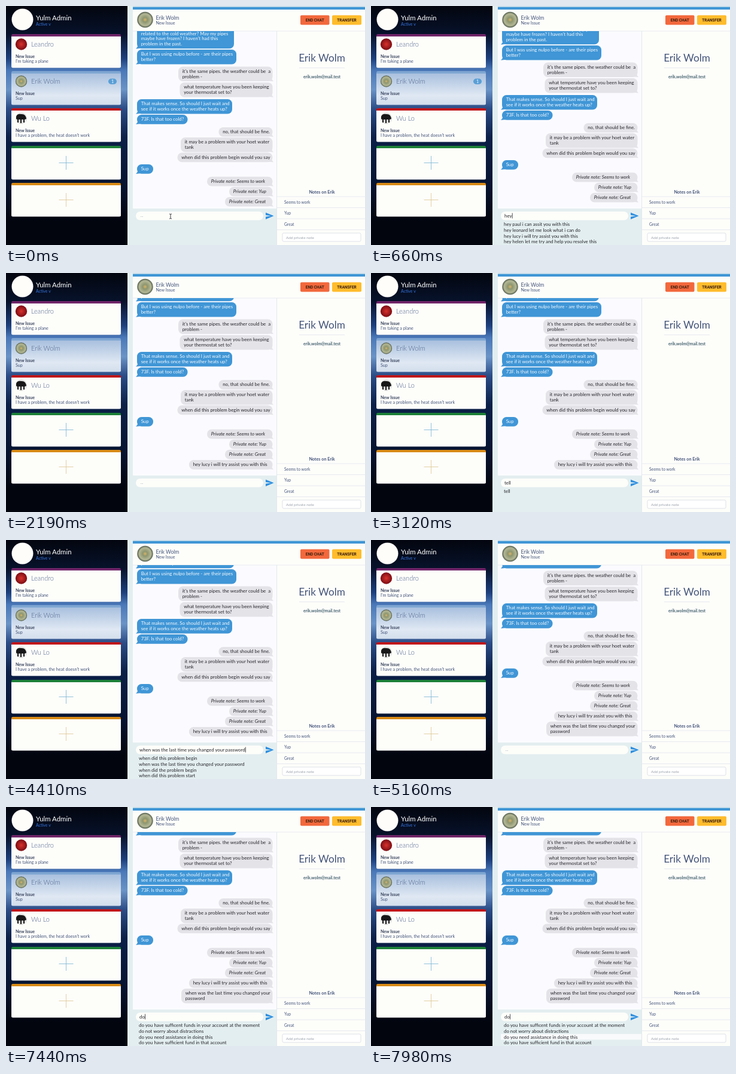
These frames come from a looping animation (600 px wide and 400 px high, 8000 ms). An HTML page:

```html
<!DOCTYPE html>
<html lang="en">
<head>
<meta charset="utf-8">
<title>Support chat with suggestions</title>
<style>
html, body { margin: 0; width: 100%; height: 100%; overflow: hidden; }
svg { display: block; width: 100vw; height: 100vh; }
text { font-family: Lato, sans-serif; white-space: pre; }
</style>
</head>
<body>
<svg id="stage" viewBox="0 0 600 400" preserveAspectRatio="none">
  <defs>
    <linearGradient id="sky" x2="0" y2="1">
      <stop offset="0" stop-color="#03060f"/>
      <stop offset=".12" stop-color="#07122b"/>
      <stop offset=".22" stop-color="#1d3f7c"/>
      <stop offset=".27" stop-color="#4a78b8"/>
      <stop offset=".35" stop-color="#6a93c6"/>
      <stop offset=".43" stop-color="#2b4c86"/>
      <stop offset=".55" stop-color="#0b2048"/>
      <stop offset=".75" stop-color="#071431"/>
      <stop offset=".9" stop-color="#02050e"/>
    </linearGradient>
    <linearGradient id="selected" x2="0" y2="1">
      <stop offset="0" stop-color="#a9c0de"/>
      <stop offset=".7" stop-color="#dfe8f3"/>
      <stop offset="1" stop-color="#d3deec"/>
    </linearGradient>
    <radialGradient id="cactus">
      <stop offset="0" stop-color="#d8b468"/>
      <stop offset=".3" stop-color="#8d9670"/>
      <stop offset=".75" stop-color="#b4b794"/>
      <stop offset="1" stop-color="#4d5a4a"/>
    </radialGradient>
    <radialGradient id="red">
      <stop offset="0" stop-color="#d8322c"/>
      <stop offset="1" stop-color="#7c0d14"/>
    </radialGradient>
    <clipPath id="chatClip"><rect x="212" y="42" width="240" height="297"/></clipPath>
  </defs>
</svg>
<script>
const stage = document.getElementById('stage');
const LOOP = 8000, CHAT_SIZE = 7.85;
const INK = '#26262c', SLATE = '#44557a', BLUE = '#4096d6', MIST = '#e4e3e8';
const PAPER = '#fdfdfa', RULE = { stroke: '#e3e6ec', 'stroke-width': .8 };

function add(parent, tag, attrs, content) {
  const node = document.createElementNS('http://www.w3.org/2000/svg', tag);
  for (const key in attrs) node.setAttribute(key, attrs[key]);
  if (content !== undefined) node.textContent = content;
  return parent.appendChild(node);
}
const box = (x, y, width, height, fill, rx = 0, parent = stage, extra = {}) =>
  add(parent, 'rect', { x, y, width, height, fill, rx, ...extra });
const disc = (cx, cy, r, fill) => add(stage, 'circle', { cx, cy, r, fill });
const path = (d, attrs, parent = stage) => add(parent, 'path', { d, ...attrs });
const label = (x, y, content, size, fill, extra = {}, parent = stage) =>
  add(parent, 'text', { x, y, 'font-size': size, fill, ...extra }, content);
const BOLD = { 'font-weight': 700 }, LIGHT = { 'font-weight': 300 };
const MIDDLE = { 'text-anchor': 'middle' };

// Sidebar
box(0, 0, 203, 400, 'url(#sky)');
disc(27.5, 22.5, 18, '#fffdfa');
label(50, 23.8, 'Yulm Admin', 11.4, '#fff');
label(50, 32.8, 'Active v', 7, '#3572dc');

function card(y, stripe, body = PAPER) {
  box(9, y, 183, 56, stripe, 2.5);
  path(`M9 ${y + 4}H192V${y + 54}q0 2.5-2.5 2.5H11.5q-2.5 0-2.5-2.5z`, { fill: body });
}
function contact(y, name, message, photo) {
  disc(25.5, y + 17, 9.7, photo);
  label(42, y + 20.8, name, 11, '#50648c', LIGHT);
  label(16, y + 39.5, 'New Issue', 7, '#37425c', BOLD);
  label(16, y + 47.5, message, 7.2, SLATE);
}
card(47, '#6f2468');
contact(47, 'Leandro', "I'm taking a plane", 'url(#red)');
card(109, '#7fa6d2', 'url(#selected)');
contact(109, 'Erik Wolm', 'Sup', 'url(#cactus)');
card(171, '#c0161a');
contact(171, 'Wu Lo', "I have a problem, the heat doesn't work", '#e4e4e2');
path('M17 189v-4q2-5 8-4q8-1 9 8l-3 1v5h-2v-5h-3v6h-2v-6h-3v5h-2v-5z', { fill: '#181818' });
for (const [y, stripe, mark] of [[234, '#1c8038', '#76b4d2'], [296, '#d88a16', '#dcc68c']]) {
  card(y, stripe);
  path(`M88.5 ${y + 28.5}h24M100.5 ${y + 17}v23`, { stroke: mark, 'stroke-width': .8 });
}
const badge = add(stage, 'g', {});
box(171, 121.5, 14, 9.5, '#5a9fd6', 4.75, badge);
label(178, 128.8, '1', 7, '#fff', MIDDLE, badge);

// Main area, header and details
box(203, 0, 397, 400, '#e3eef0');
box(212, 1.5, 388, 5, BLUE);
box(212, 6, 388, 36, PAPER);
box(212, 42, 240, 297, '#fbfbff');
box(453, 42, 147, 358, PAPER);
path('M212 42H600M452.5 42V400', RULE);
disc(232.5, 23, 13.2, 'url(#cactus)');
label(250.5, 22.5, 'Erik Wolm', 8.6, SLATE);
label(250.5, 31, 'New Issue', 7.1, SLATE);

function button(x, width, fill, caption) {
  box(x, 15.5, width, 16, fill, 2);
  label(x + width / 2, 25.8, caption, 6.5, '#3c2010',
    { ...BOLD, ...MIDDLE, style: 'font-family: Roboto, sans-serif' });
}
button(492, 48.5, '#f2683c', 'END CHAT');
button(545, 49, '#ffbc2c', 'TRANSFER');

label(528, 92.5, 'Erik Wolm', 17.2, SLATE, MIDDLE);
path('M490 103.5H566', RULE);
label(528, 121, 'erik.wolm@mail.test', 6.9, '#42606e', { ...BOLD, ...MIDDLE });
label(528, 313.6, 'Notes on Erik', 7.2, SLATE, { ...BOLD, ...MIDDLE });
['Seems to work', 'Yup', 'Great'].forEach((note, i) => {
  path(`M453 ${319 + i * 18.5}H600`, RULE);
  label(465, 330.8 + i * 18.6, note, 6.7, SLATE);
});
path('M453 374.5H600', RULE);
box(462, 380, 131, 14, '#fff', 2, stage, { stroke: '#d6dae2', 'stroke-width': .8 });
label(468, 389.5, 'Add private note', 6.4, '#9ca2ac');

// Conversation; y is the bubble top
const chat = add(add(stage, 'g', { 'clip-path': 'url(#chatClip)' }), 'g', {});
function bubble(x, y, right, lines, mine, italic) {
  const group = add(chat, 'g', {}), height = lines.length * 8.7 + 7;
  const bottom = y + height, fill = mine ? MIST : BLUE;
  box(x, y, right - x, height, fill, 7.5, group);
  path(mine
    ? `M${right - 2} ${bottom - 9}q0 6 3.5 9q-6 .5-10-2z`
    : `M${x + 2} ${bottom - 9}q0 6-4 9q6 .5 11-2z`, { fill }, group);
  lines.forEach((line, i) => label(x + 6.7, y + 10.3 + i * 8.7, line, CHAT_SIZE,
    mine ? INK : '#f4faff', italic ? { 'font-style': 'italic' } : {}, group));
  return group;
}
const theirs = (y, right, ...lines) => bubble(219, y, right, lines, false);
const mine = (x, y, ...lines) => bubble(x, y, 445.5, lines, true);
const privateNote = (x, y, note) => bubble(x, y, 445.5, ['Private note: ' + note], true, true);

theirs(22.5, 381, '', 'related to the cold weather? May my pipes',
  "maybe have frozen? I haven't had this", 'problem in the past.');
theirs(66, 385, 'But I was using nulpo before - are their pipes', 'better?');
mine(288, 94.5, "it's the same pipes. the weather could be  a", 'problem -');
mine(290.5, 121, 'what temperature have you been keeping', 'your thermostat set to?');
theirs(149, 378, 'That makes sense. So should I just wait and', 'see if it works once the weather heats up?');
theirs(175, 303.5, '73F. Is that too cold?');
mine(355.5, 196, 'no, that should be fine.');
mine(292, 213, 'it may be a problem with your hoet water', 'tank');
mine(286.5, 238.5, 'when did this problem begin would you say');
theirs(258, 246, 'Sup');
privateNote(336, 278.7, 'Seems to work');
privateNote(373, 295.7, 'Yup');
privateNote(366, 312.7, 'Great');
const sent = [
  mine(306, 330, 'hey lucy i will try assist you with this'),
  mine(293, 347, 'when was the last time you changed your', 'password')
];

// Composer
box(217, 344, 213, 14.5, PAPER, 7.2);
path('M434 345.8L447.5 351.3L434 357V352.7L443 351.3L434 350z', { fill: '#2d8fe0' });
const dots = label(224.5, 352.5, '...', 7, '#a8b0b8');
const input = label(223, 353.6, '', CHAT_SIZE, INK);
const caret = box(0, 346.5, .8, 9, INK);
const pointer = path('M273 348q2 0 2 1q0-1 2-1M275 349v6M273 356q2 0 2-1q0 1 2 1',
  { fill: 'none', stroke: INK, 'stroke-width': .9 });
const highlight = box(217, 0, 235, 9.6, '#f8fafb');
const rows = [0, 1, 2, 3].map(i => label(222, 368 + i * 9.75, '', CHAT_SIZE, INK));

const lists = {
  none: [],
  hey: ['hey paul i can assit you with this', 'hey leonard let me look what i can do',
    'hey lucy i will try assist you with this', 'hey helen let me try and help you resolve this'],
  tell: ['tell'],
  when: ['when did this problem begin', 'when was the last time you changed your password',
    'when did the problem begin', 'when did this problem start'],
  do: ['do you have sufficent funds in your account at the moment', 'do not worry about distractions',
    'do you need assistance in doing this', 'do you have sufficient fund in that account'],
  doYou: ['do you have sufficent funds in your account at the moment', 'do you need assistance in doing this',
    'do you have sufficient fund in that account', 'do you have sufficent money in that account currently']
};

// Each event sets the whole composer state from its time on.
const events = [];
let sentCount = 0;
const at = (time, text, list, row = -1) => events.push({ time, text, list, row, sentCount });
function type(start, step, from, to, list) {
  const change = to.length - from.length, dir = Math.sign(change);
  const word = dir > 0 ? to : from;
  for (let i = 1; i <= Math.abs(change); i++) {
    const text = word.slice(0, from.length + dir * i);
    at(start + (i - 1) * step, text, !text ? 'none' : text.startsWith('do y') ? 'doYou' : list);
  }
}
function pick(time, text, list, row) {
  at(time - 180, text, list, row);
  at(time, lists[list][row], list);
}
function send(time) { sentCount++; at(time, '', 'none'); }

at(0, '', 'none');
type(300, 120, '', 'hey', 'hey');
pick(1200, 'hey', 'hey', 2);
send(1900);
type(2230, 115, '', 'tell', 'tell');
type(3240, 70, 'tell', '', 'tell');
type(3550, 110, '', 'when', 'when');
pick(4250, 'when', 'when', 1);
send(4850);
type(5250, 125, '', 'do you', 'do');
type(6630, 110, 'do you', 'do', 'do');
[7620, 7760, 7900].forEach((time, row) => at(time, 'do', 'do', row));

const show = (node, visible) => node.setAttribute('visibility', visible ? 'visible' : 'hidden');

function render(t) {
  const state = events.findLast(event => event.time <= t);
  const started = t >= events[1].time;
  const scroll = started ? [0, -17, -43][state.sentCount] : 7;
  chat.setAttribute('transform', `translate(0 ${scroll})`);
  sent.forEach((message, i) => show(message, i < state.sentCount));
  show(badge, state.sentCount === 0);
  show(pointer, !started);
  show(dots, !state.text);
  input.textContent = state.text;
  caret.setAttribute('x', 223.3 + (state.text ? input.getComputedTextLength() : 0));
  show(caret, state.text && (t - state.time) % 1000 < 500);
  rows.forEach((row, i) => row.textContent = lists[state.list][i] || '');
  show(highlight, state.row >= 0);
  highlight.setAttribute('y', 360.4 + Math.max(0, state.row) * 9.75);
}

const startTime = performance.now();
function frame() {
  render((performance.now() - startTime) % LOOP);
  requestAnimationFrame(frame);
}
render(0);
requestAnimationFrame(frame);
</script>
</body>
</html>
```
